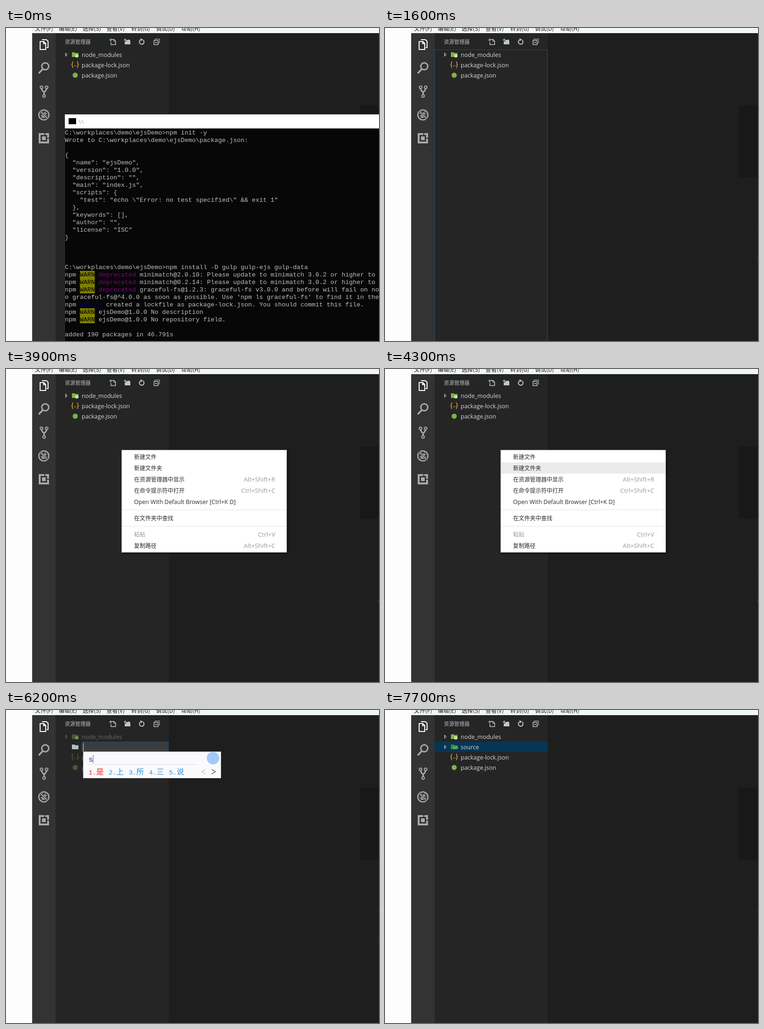
Recreate the animation shown at these times as an HTML page with a canvas. Size 798 by 670 pixels, loop 8000 ms.

```html
<!DOCTYPE html>
<html lang="zh-CN">
<head>
<meta charset="utf-8">
<title>Creating a folder in the explorer</title>
<style>
html, body { margin: 0; width: 100%; height: 100%; overflow: hidden; background: #fdfdfd; }
canvas { display: block; }
</style>
</head>
<body>
<canvas id="stage" width="798" height="670"></canvas>
<script>
const ctx = document.getElementById('stage').getContext('2d');
const LOOP = 8000;
const CJK = '"Noto Sans CJK SC", "Noto Sans CJK", sans-serif';
const UI = '"Open Sans", ' + CJK;
const MONO = '"Liberation Mono", monospace';
const GREEN = '#7cb342', GREY = '#a9a9a9', LIGHT = '#d8d8d8';

function box(x, y, w, h, color) {
  ctx.fillStyle = color;
  ctx.fillRect(x, y, w, h);
}
function frame(x, y, w, h, color) {
  ctx.strokeStyle = color;
  ctx.lineWidth = 1;
  ctx.strokeRect(x + .5, y + .5, w - 1, h - 1);
}
function fill(d, color) {
  ctx.fillStyle = color;
  ctx.fill(new Path2D(d));
}
function line(d, color, width = 1) {
  ctx.strokeStyle = color;
  ctx.lineWidth = width;
  ctx.stroke(new Path2D(d));
}
function disc(x, y, r, color, width) {
  ctx.beginPath();
  ctx.arc(x, y, r, 0, 7);
  ctx.fillStyle = ctx.strokeStyle = color;
  if (width) { ctx.lineWidth = width; ctx.stroke(); } else ctx.fill();
}
function text(s, x, y, color, font, align = 'left') {
  ctx.font = font;
  ctx.textAlign = align;
  ctx.fillStyle = color;
  ctx.fillText(s, x, y);
}
// Fixed-cell text: wide characters take one em, the others half. Returns the end x.
function cells(s, x, y, size, color) {
  for (const run of s.match(/[\u3000-\uffff]+|[^\u3000-\uffff]+/g) || []) {
    const wide = run > '\u3000';
    text(run, x, y, color, wide ? `${size}px ${CJK}` : `${size / 1.2}px ${MONO}`);
    x += run.length * (wide ? size : size / 2);
  }
  return x;
}
function faded(alpha, draw) {
  ctx.save();
  ctx.globalAlpha = alpha;
  draw();
  ctx.restore();
}

function activityBar() {
  box(56, 11, 50, 659, '#333333');
  line('M77 25H86.5L90 28.5V42H87M73 29H81L85 33V46H73ZM80.5 29V33.5H85', '#fff', 2);
  disc(84, 82, 7.5, GREY, 3);
  line('M78.5 88L70 97', GREY, 3.6);
  for (const [x, y] of [[76, 127], [87, 127], [81.5, 145.5]]) disc(x, y, 2.8, GREY, 2);
  line('M76 130Q77 134 81.5 138Q86 134 87 130M81.5 137V143', GREY, 3);
  disc(81, 186, 10.8, GREY, 2.6);
  fill('M77 184Q81 178 85 184V189Q81 196 77 189Z', GREY);
  line('M74 183H88M74 188H88M76 193L79 190M86 193L83 190M77 178L79 182M85 178L83 182', GREY, 1.5);
  line('M73 178L89 194', '#333', 4);
  line('M73 178L89 194', GREY, 2);
  box(70, 225, 22, 22, GREY);
  box(74, 229, 14, 14, '#333');
  box(77, 232, 8, 8, GREY);
  box(82, 225, 2, 7, '#333');
  box(85, 235, 7, 2, '#333');
}

function editor() {
  box(0, 0, 798, 670, '#fdfdfd');
  box(56, 0, 742, 11, '#f0f7f2');
  ['文件(F)', '编辑(E)', '选择(S)', '查看(V)', '转到(G)', '调试(D)', '帮助(H)'].forEach((s, i) =>
    text(s, [62, 113, 164, 215, 268, 321, 375][i], 6, '#222', `12px ${CJK}`));
  box(348, 11, 450, 659, '#1e1e1e');
  box(757, 166, 154, 154, '#181818');
  text('显示所有命令', 796, 429, '#888', `13px ${CJK}`);
  text('在文件中查找', 796, 499, '#888', `13px ${CJK}`);
  activityBar();
  box(106, 11, 242, 659, '#252526');
  text('资源管理器', 126, 34, '#bbb', `11px ${CJK}`);
  line('M226 24.5H231L234.5 28V35.5H224.5V30', '#c5c5c5', 1.5);
  line('M230.5 24V28.5H235', '#c5c5c5');
  fill('M254 29H257V26H260L261 25H265V27H266V35H254Z', '#c5c5c5');
  line('M221 25.5H227M224 22.5V28.5M252 25.5H258M255 22.5V28.5', '#89d185', 1.6);
  line('M287 26A5 5 0 1 0 293 25.5', '#c5c5c5', 2);
  fill('M287 22.5L293 24L288.5 28.5Z', '#c5c5c5');
  line('M319 26V23.5H328.5V32H326', '#c5c5c5');
  line('M316.5 26.5H325.5V35.5H316.5ZM318.5 31H323.5', '#c5c5c5', 1.4);
}

function folder(y, color) {
  fill(`M141 ${y - 5}H147L148.5 ${y - 3.5}H155V${y + 5}H141Z`, color);
}
function chevron(y) {
  line(`M127.5 ${y - 3.5}L131 ${y}L127.5 ${y + 3.5}Z`, '#e8e8e8');
}
function label(s, y) {
  text(s, 162, y + 5, LIGHT, `12.5px ${UI}`);
}
function tree(shift) {
  chevron(57);
  folder(57, GREEN);
  disc(151.5, 59.5, 3.8, '#c5e1a5');
  label('node_modules', 57);
  const y = 79 + shift;
  text('{', 139.5, y + 4, '#fbc02d', '14px Roboto, sans-serif');
  text('}', 151.5, y + 4, '#fbc02d', '14px Roboto, sans-serif');
  box(146, y + 1, 1.5, 1.5, '#fbc02d');
  box(149, y + 1, 1.5, 1.5, '#fbc02d');
  label('package-lock.json', y);
  disc(148, y + 22, 5.5, GREEN);
  label('package.json', y + 22);
}
function sourceIcon() {
  folder(79, '#388e3c');
  line('M149 78L146.5 80.5L149 83M153.5 78L156 80.5L153.5 83M152 77.5L150.5 83.5', '#81c784', 1.2);
}

const WARN = '{w}WARN{}', OLD = `npm ${WARN} {d}deprecated{} `;
const CONSOLE = String.raw`C:\workplaces\demo\ejsDemo>npm init -y
Wrote to C:\workplaces\demo\ejsDemo\package.json:

{
  "name": "ejsDemo",
  "version": "1.0.0",
  "description": "",
  "main": "index.js",
  "scripts": {
    "test": "echo \"Error: no test specified\" && exit 1"
  },
  "keywords": [],
  "author": "",
  "license": "ISC"
}



C:\workplaces\demo\ejsDemo>npm install -D gulp gulp-ejs gulp-data
${OLD}minimatch@2.0.10: Please update to minimatch 3.0.2 or higher to avoid
${OLD}minimatch@0.2.14: Please update to minimatch 3.0.2 or higher to avoid
${OLD}graceful-fs@1.2.3: graceful-fs v3.0.0 and before will fail on node
o graceful-fs@^4.0.0 as soon as possible. Use 'npm ls graceful-fs' to find it in the
npm {n}notice{} created a lockfile as package-lock.json. You should commit this file.
npm ${WARN} ejsDemo@1.0.0 No description
npm ${WARN} ejsDemo@1.0.0 No repository field.

added 190 packages in 46.791s`.split('\n');
const INK = { w: '#000', d: '#800080', n: '#000080' };

function terminal() {
  box(125, 184, 700, 500, '#303234');
  box(126, 185, 700, 30, '#fff');
  box(126, 215, 700, 470, '#070707');
  box(134, 193, 16, 13, '#000');
  cells('\\\\', 155, 205, 12, '#888');
  CONSOLE.forEach((s, row) => {
    let x = 126, y = 228 + row * 16;
    // Marks such as {w} switch the colour and {} restores it.
    let mark = '';
    for (const part of s.split(/(\{[wdn]?\})/)) {
      const m = part.match(/^\{([wdn]?)\}$/);
      if (m) { mark = m[1]; continue; }
      if (mark === 'w') box(x, y - 12, part.length * 8, 16, '#808000');
      x = cells(part, x, y, 16, INK[mark] || '#c0c0c0');
    }
  });
}
function closing(step) {
  faded([.6, .2][step], () => {
    const scale = [.97, .93][step];
    ctx.translate(560, 500);
    ctx.scale(scale, scale);
    ctx.translate(-560, -500);
    terminal();
  });
}

const MENU = [
  ['新建文件', 188], ['新建文件夹', 212], ['在资源管理器中显示', 236, 'Alt+Shift+R'],
  ['在命令提示符中打开', 260, 'Ctrl+Shift+C'], ['Open With Default Browser [Ctrl+K D]', 284],
  ['在文件夹中查找', 319], ['粘贴', 354, 'Ctrl+V'], ['复制路径', 378, 'Alt+Shift+C']
];
function contextMenu(hover) {
  ctx.save();
  ctx.shadowColor = 'rgba(0,0,0,.6)';
  ctx.shadowBlur = 4;
  ctx.shadowOffsetX = ctx.shadowOffsetY = 2;
  box(247, 173, 354, 220, '#fff');
  ctx.restore();
  frame(247, 173, 354, 220, '#a8a8a8');
  if (hover >= 0) box(248, 176 + hover * 24, 352, 24, '#ebebeb');
  box(248, 301, 352, 1, '#e3e3e3');
  box(248, 336, 352, 1, '#e3e3e3');
  for (const [s, y, keys] of MENU) {
    const font = s[0] === 'O' ? `12.45px ${UI}` : `12px ${CJK}`;
    text(s, 274, y + 4.5, s === '粘贴' ? '#999' : '#2a2a2a', font);
    if (keys) text(keys, 576, y + 5, '#999', `13.2px ${UI}`, 'right');
  }
}

// Start time, typed letters, candidates.
const TYPING = [
  [6200, 's', '是 上 所 三 说'],
  [6500, 'so', '所 搜 所以 锁 搜索'],
  [6600, 'sou', '搜 搜索 艘 收 嗖'],
  [6800, "sou'r", '搜人 sour 收(shou)入 搜 艘'],
  [6900, "sou'r'c'e", '搜人才 source 搜 艘 收']
];
function inputMethod(t) {
  const [start, typed, list] = TYPING.filter(k => t >= k[0]).pop();
  const words = list.split(' ').map((w, i) => `${i + 1}.${w}`);
  const width = words.reduce((sum, w) =>
    sum + 11 + [...w].reduce((n, c) => n + (c > '\u3000' ? 16 : 8), 0), -11);
  const end = Math.max(460, 177 + width + 54);
  box(165, 89, end - 165, 57, '#fafafc');
  frame(165, 89, end - 165, 57, '#e4e4ea');
  box(174, 116, end - 224, 1, '#e0e0e3');
  const bold = 'bold 16px "Liberation Sans", sans-serif';
  text(typed, 177, 111, '#2f86f0', bold);
  box(Math.round(177 + ctx.measureText(typed).width), 96, 1, 18, '#f03020');
  if (start === 6800) {
    cells('6.', 255, 108, 12, '#a5a5a8');
    cells('青穗词汇：搜软', 267, 108, 12, '#a5a5a8');
    box(267, 110, 84, 1, '#a5a5a8');
  }
  let x = 177;
  words.forEach((w, i) => x = cells(w, x, 138, 16, i ? '#2490d8' : '#f02818') + 11);
  line(`M${end - 34} 127L${end - 41} 132L${end - 34} 137`, '#ccc', 1.6);
  line(`M${end - 20} 127L${end - 12} 132L${end - 20} 137`, '#777', 1.8);
  disc(end - 17, 103, 13.5, '#a4c8fa');
}

function naming(t) {
  faded(.38, () => tree(22));
  box(162, 68, 186, 22, '#3c3c3c');
  frame(162, 68, 186, 22, '#17507a');
  const done = t >= 7200;
  if (done) {
    sourceIcon();
    text('source', 165, 84, LIGHT, `12.5px ${UI}`);
  } else folder(79, '#b0bec5');
  if (t < 5700 || t >= 6200 && t < 6700 || done) box(done ? 203 : 165, 71, 1, 17, '#ddd');
  if (t >= 6200 && t < 7000) inputMethod(t);
}

function draw(now) {
  const t = now % LOOP;
  editor();
  if (t >= 7700) {
    box(106, 68, 242, 22, '#073655');
    tree(22);
    chevron(79);
    sourceIcon();
    label('source', 79);
  } else if (t >= 5300) naming(t);
  else tree(0);

  if (t < 1400) terminal();
  else if (t < 1600) closing(t < 1500 ? 0 : 1);
  else if (t < 3800) {
    box(347, 46, 1, 624, '#3f4850');
    box(106, 46, 242, 1, '#14507a');
    box(106, 46, 1, 624, '#14507a');
  } else if (t >= 3900 && t < 5200) contextMenu(t < 4200 ? -1 : t < 4300 ? 0 : 1);
  requestAnimationFrame(draw);
}
requestAnimationFrame(draw);
</script>
</body>
</html>
```
